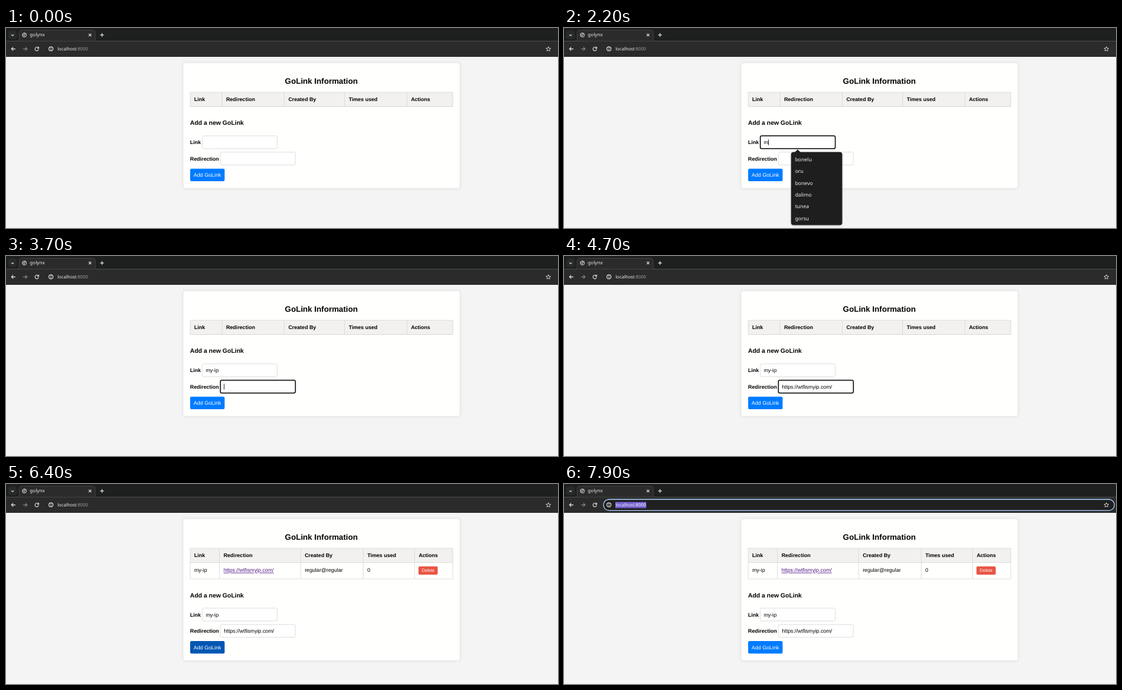
An HTML page that plays this animation: 860x312 px, repeating every 8000 ms.

```html
<!DOCTYPE html>
<html lang="en">
<head>
<meta charset="utf-8">
<title>golynx</title>
<style>
  html, body { margin: 0; width: 100%; height: 100%; overflow: hidden; background: #f4f4f4; }
  svg { display: block; width: 860px; height: 312px; }
  text { font: 8.2px "Liberation Sans", Arial, sans-serif; text-rendering: geometricPrecision; white-space: pre; }
  .bold { font-weight: bold; }
  .ui { font-family: "Noto Sans", "Open Sans", sans-serif; }
  .icon { fill: none; stroke-width: 1.1; }
</style>
</head>
<body>
<svg id="stage" viewBox="0 0 860 312"></svg>
<script>
const LOOP = 8000;
const ROW = 25.5;
const URL_TEXT = 'https://wtfismyip.com/';
const HEADS = ['Link', 'Redirection', 'Created By', 'Times used', 'Actions'];
const SUGGESTIONS = ['bonelu', 'oru', 'bonevo', 'dalimo', 'tunea', 'gorsu'];
const BLUE = '#007bff', DARK_BLUE = '#0056b3';

// Each step changes only the listed parts of the state.
const STEPS = [
  [0, { link: '', url: '', focus: '', caret: false, menu: false, hover: false, row: false, bar: false }],
  [1100, { focus: 'link', caret: true, menu: true }],
  [1600, { caret: false }],
  [2200, { link: 'm', caret: true }],
  [2300, { menu: false }],
  [2400, { link: 'my' }],
  [2700, { link: 'my-' }],
  [2900, { link: 'my-i' }],
  [3000, { link: 'my-ip' }],
  [3700, { focus: 'url' }],
  [4100, { url: URL_TEXT }],
  [4700, { caret: false }],
  [5200, { caret: true }],
  [5300, { hover: true }],
  [5900, { focus: '' }],
  [6000, { row: true, hover: false }],
  [6400, { hover: true }],
  [6700, { hover: false }],
  [7800, { bar: true }]
];

const stage = document.getElementById('stage');
const pen = document.createElement('canvas').getContext('2d');
pen.font = '82px "Liberation Sans", Arial, sans-serif';
const widthOf = s => pen.measureText(s).width / 10;

const rect = (x, y, w, h, fill, extra = '') =>
  `<rect x="${x}" y="${y}" width="${w}" height="${h}" fill="${fill}" ${extra}/>`;
const text = (x, y, s, { size = 8.2, fill = '#000', cls = '', extra = '' } = {}) =>
  `<text x="${x}" y="${y}" class="${cls}" style="font-size:${size}px" fill="${fill}" ${extra}>${s}</text>`;
const icon = (d, color = '#e4e4e4', extra = '') =>
  `<path class="icon" d="${d}" stroke="${color}" ${extra}/>`;
const bold = (x, y, s, size) => text(x, y, s, { size, cls: 'bold' });

function browser(s) {
  const tab = 'M0 20.5H17Q20.5 20.5 20.5 17V8Q20.5 3.5 25 3.5H134.5Q139 3.5 139 8V17Q139 20.5 142.5 20.5H860';
  const out = [
    rect(0, 0, 860, 20.5, '#1e201f'),
    rect(0, 20.5, 860, 24.5, '#2a2b2a'),
    rect(3.5, 4, 13.5, 13.5, '#292b2a', 'rx="4"'),
    `<path d="${tab}" fill="#2a2b2a" stroke="#484a49" stroke-width=".8"/>`,
    icon('M8.3 10.3L10.2 12.1L12.1 10.3'),
    '<circle cx="28.6" cy="10.9" r="3.3" fill="#3a3b3a" stroke="#c4c4c4"/>',
    icon('M26 10.2L28.6 11.3L28.2 13.4M28.4 8L29.2 9.6L31.4 10', '#c4c4c4'),
    text(37, 13.2, 'golynx', { size: 7.5, fill: '#e6e6e6', cls: 'ui' }),
    icon('M128.9 8.8L132.9 12.8M132.9 8.8L128.9 12.8'),
    icon('M146.8 10.9H152.4M149.6 8.1V13.7')
  ];
  if (s.bar) {
    out.push(rect(61.5, 24, 796, 17.4, '#1f201f', 'rx="8.7" stroke="#a8c7fa" stroke-width="1.3"'),
      rect(80, 28, 48.2, 9.6, '#7560d0'));
  }
  out.push(
    icon('M14.6 32.6H8.6M11.3 29.8L8.5 32.6L11.3 35.4'),
    icon('M26.8 32.6H32.8M30.1 29.8L32.9 32.6L30.1 35.4', '#858585'),
    icon('M50.2 30.7A2.9 2.9 0 1 0 50.9 33.4M50.9 29.3V31.6H48.6'),
    '<circle cx="70" cy="32.6" r="3.2" class="icon" stroke="#e4e4e4"/>',
    icon('M70 32.2V34.5M70 30.6V31.4'),
    text(80.3, 35.2, `localhost<tspan fill="${s.bar ? '#fff' : '#9c9e9d'}">:8000</tspan>`,
      { size: 7, fill: '#f0f0f0', cls: 'ui' }),
    icon('M845 29.1L846 31.5L848.6 31.7L846.6 33.4L847.2 35.9L845 34.5L842.8 35.9L843.4 33.4L841.4 31.7L844 31.5Z',
      '#d4d4d4', 'style="stroke-width:.9"')
  );
  return out.join('');
}

function table(s) {
  const cols = s.row ? [332.5, 459, 556.5, 636.5] : [336.5, 433.5, 527.5, 624.5];
  const starts = [286.8, ...cols].map(x => x + 6.4);
  const bottom = s.row ? 148 : 122.5;
  let out = rect(287, 100.3, 409.5, 22.2, '#f2f1f0');
  out += `<path d="M287 100.3H696V${bottom}H287ZM287 122.5H696${cols.map(x => `M${x} 100.3V${bottom}`).join('')}"
    fill="none" stroke="#d9d9d8" stroke-width=".8"/>`;
  out += HEADS.map((h, i) => bold(starts[i], 114, h)).join('');
  if (s.row) {
    out += text(starts[0], 137.4, 'my-ip')
      + text(starts[1], 137.4, URL_TEXT, { fill: '#551a8b', extra: 'text-decoration="underline"' })
      + text(starts[2], 137.4, 'regular@regular')
      + text(starts[3], 137.4, '0')
      + rect(642.6, 128.4, 30, 13.2, '#e95444', 'rx="2"')
      + text(647.8, 137.4, 'Delete', { size: 6.83, fill: '#fff' });
  }
  return out;
}

function field(x, y, value, focused, caret) {
  const ring = focused ? 'stroke="#101010" stroke-width="1.5"' : 'stroke="#d3d3d3" stroke-width=".7"';
  let out = rect(x, y, 116.8, 20, '#fff', `rx="2.2" ${ring}`) + text(x + 5.4, y + 12.8, value);
  if (focused && caret) out += rect(x + 5.5 + widthOf(value), y + 5.6, 0.8, 9, '#000');
  return out;
}

function form(s) {
  return `<g transform="translate(0 ${s.row ? ROW : 0})">`
    + bold(286.8, 151.2, 'Add a new GoLink', 9.59)
    + bold(286.8, 181, 'Link') + field(305.8, 168.2, s.link, s.focus === 'link', s.caret)
    + bold(286.8, 206.5, 'Redirection') + field(334, 193.7, s.url, s.focus === 'url', s.caret)
    + rect(286.9, 219.5, 53.7, 19.6, s.hover ? DARK_BLUE : BLUE, 'rx="2"')
    + text(292.3, 232, 'Add GoLink', { fill: '#fff' })
    + '</g>';
}

function menu() {
  return rect(353.7, 193.6, 79.8, 114, '#1d1e1d', 'rx="4" style="filter:drop-shadow(0 1px 1px #0003)"')
    + '<path d="M359.3 194L364 189.6L368.7 194Z" fill="#1d1e1d"/>'
    + SUGGESTIONS.map((name, i) =>
      text(359.9, 207.8 + i * 18.4, name, { size: 8, fill: '#efefef', cls: 'ui' })).join('');
}

function draw(s) {
  stage.innerHTML = rect(0, 45, 860, 267, '#f4f4f4')
    + rect(276.3, 54.8, 430.5, 195 + (s.row ? ROW : 0), '#fffffd',
      'rx="4" style="filter:drop-shadow(0 0 2.5px rgba(0,0,0,.12))"')
    + browser(s)
    + bold(434.6, 87, 'GoLink Information', 12.3)
    + table(s) + form(s) + (s.menu ? menu() : '');
}

let shown = -1;
function tick() {
  const t = performance.now() % LOOP;
  const count = STEPS.filter(([at]) => at <= t).length;
  if (count !== shown) {
    shown = count;
    draw(Object.assign({}, ...STEPS.slice(0, count).map(step => step[1])));
  }
  requestAnimationFrame(tick);
}
tick();
</script>
</body>
</html>
```
